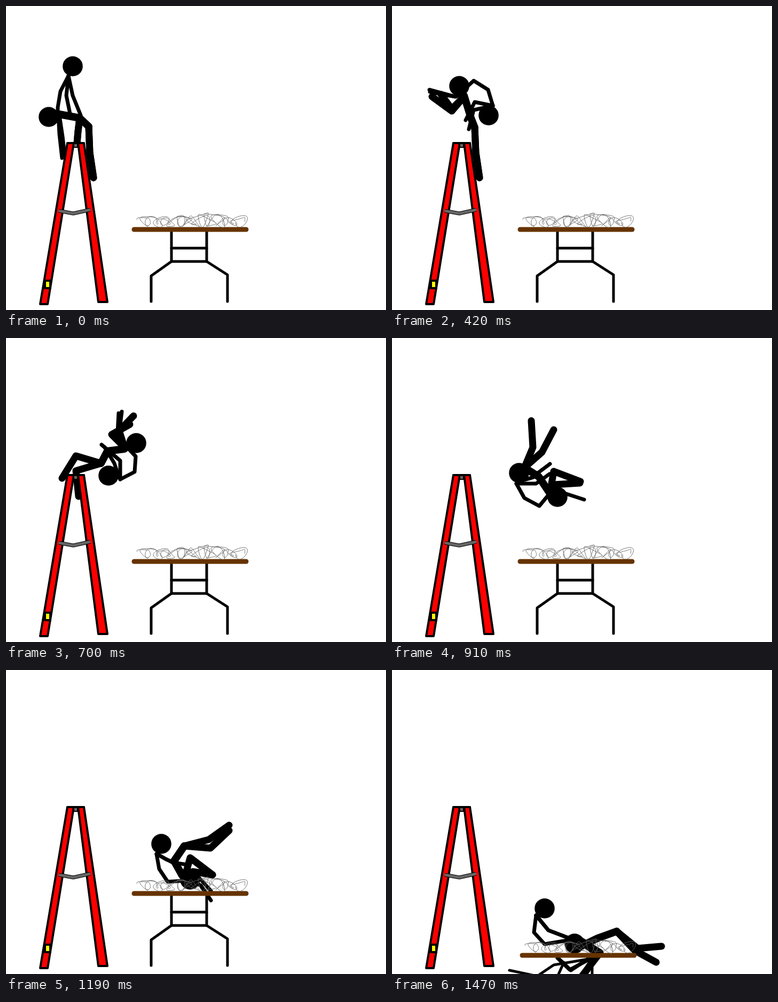
Write an HTML page with a canvas that moves like this. It is 712 by 570 pixels and loops after 1.96 s.

```html
<!DOCTYPE html>
<html lang="en">
<head>
<meta charset="utf-8">
<title>Ladder fall</title>
<style>
html, body { margin: 0; width: 100%; height: 100%; overflow: hidden; background: #fff; }
canvas { display: block; }
</style>
</head>
<body>
<canvas id="stage" width="712" height="570"></canvas>
<script>
const ctx = document.getElementById('stage').getContext('2d');
const LOOP = 1960, STEP = 70;
const KEYS = [0, 3, 6, 10, 13, 17, 21];

const points = text => text.split(' ').map(p => p.split(',').map(Number));
const part = (width, ...poses) => ({ width, poses: poses.map(points) });
const mix = (a, b, k) => a + (b - a) * k;
const mixPoint = (p, q, k) => [mix(p[0], q[0], k), mix(p[1], q[1], k)];

// hip, waist, neck, head
const torso = part(14,
  '155,226 138,210 100,203 80,208',
  '155,228 138,213 102,188 84,188',
  '155,228 148,210 135,168 126,150',
  '178,235 190,212 222,208 244,197',
  '248,243 275,260 295,290 310,298',
  '334,330 315,358 330,385 345,393',
  '421,490 385,503 350,520 342,513');

const legs = [
  part(13,
    '155,226 157,275 164,322', '155,228 157,275 164,322', '155,228 157,275 164,322',
    '178,235 131,221 105,263', '248,243 264,205 261,155',
    '334,330 380,318 418,291', '421,490 460,522 505,518'),
  part(13,
    '155,226 157,275 164,322', '155,228 157,275 164,322', '155,228 157,275 164,322',
    '178,235 131,249 136,297', '248,243 281,214 303,172',
    '334,330 383,334 418,301', '421,490 455,526 495,548')
];

// limbs carried along by the neck of the torso
const carried = [
  part(13,
    '138,210 135,235 133,257', '138,213 125,234 112,254', '135,170 112,197 75,170',
    '222,205 212,174 239,146', '296,290 303,250 353,269',
    '335,388 345,352 387,384', '350,505 390,530 355,575'),
  part(13,
    '138,210 135,235 133,257', '138,213 125,234 112,254', '135,170 112,193 92,166',
    '222,205 198,181 232,162', '296,288 303,275 352,272',
    '335,388 350,378 387,384', '350,505 385,532 360,570'),
  part(7,
    '98,203 100,240 105,285', '102,190 96,215 58,248', '135,165 118,170 70,157',
    '222,200 209,178 211,141', '300,285 320,290 360,303',
    '335,390 365,404 384,432', '365,545 333,562 310,540'),
  part(7,
    '100,205 106,245 110,280', '104,192 102,217 76,257', '120,170 100,167 71,161',
    '222,200 212,178 217,138', '295,288 272,254 296,236',
    '335,390 362,390 384,414', '370,540 335,563 312,541')
];

const rider = part(0, '125,113', '181,148', '181,205', '192,258', '238,253', '291,326', '286,447');
const riderArms = [
  part(7,
    '117,131 102,160 97,190 97,200', '163,149 130,151 105,170 102,190',
    '189,187 180,157 153,140 140,152', '214,265 241,251 243,222 230,208',
    '233,273 248,300 276,315 295,292', '282,345 287,373 303,397 335,395',
    '270,460 266,492 286,514 340,505'),
  part(7,
    '117,131 113,168 120,202', '163,149 134,173 141,210', '189,187 155,180 138,214',
    '214,265 214,230 179,200', '233,273 270,273 295,255',
    '282,345 312,361 340,365', '270,460 293,488 335,504'),
  part(7,
    '117,131 125,168 140,205', '163,149 134,173 141,210', '189,187 153,195 144,231',
    '212,262 203,235 185,205', '240,268 262,262 275,258',
    '283,345 300,355 317,362', '270,460 293,488 335,504')
];

// each pair: standing, broken
const tableLegs = [
  part(5, '310,424 310,479 272,506 272,554', '362,543 303,553 272,574 220,563'),
  part(5, '376,424 376,479 415,504 415,554', '375,540 375,595 415,620 415,670'),
  part(5, '310,454 376,454', '322,548 310,575'),
  part(5, '310,479 376,479', '303,600 370,600')
];

// Limbs swing by angle; large swings favour the clockwise way.
function swing(a, b, k) {
  const out = [mixPoint(a[0], b[0], k)];
  for (let i = 1; i < a.length; i++) {
    const ax = a[i][0] - a[i - 1][0], ay = a[i][1] - a[i - 1][1];
    const bx = b[i][0] - b[i - 1][0], by = b[i][1] - b[i - 1][1];
    const from = Math.atan2(ay, ax);
    let turn = Math.atan2(by, bx) - from;
    while (turn > Math.PI + 1) turn -= 2 * Math.PI;
    while (turn <= 1 - Math.PI) turn += 2 * Math.PI;
    const length = mix(Math.hypot(ax, ay), Math.hypot(bx, by), k);
    const angle = from + turn * k, last = out[i - 1];
    out.push([last[0] + length * Math.cos(angle), last[1] + length * Math.sin(angle)]);
  }
  return out;
}

function line(pts, width, color = '#000', cap = 'round') {
  ctx.beginPath();
  pts.forEach(p => ctx.lineTo(p[0], p[1]));
  ctx.lineWidth = width;
  ctx.strokeStyle = color;
  ctx.lineCap = cap;
  ctx.lineJoin = 'round';
  ctx.stroke();
}

function shape(text, fill, width) {
  ctx.beginPath();
  points(text).forEach(p => ctx.lineTo(p[0], p[1]));
  ctx.closePath();
  ctx.fillStyle = fill;
  ctx.fill();
  ctx.lineWidth = width;
  ctx.strokeStyle = '#000';
  ctx.lineJoin = 'round';
  ctx.stroke();
}

function head([x, y]) {
  ctx.beginPath();
  ctx.arc(x, y, 18.8, 0, 2 * Math.PI);
  ctx.fillStyle = '#000';
  ctx.fill();
}

function figures(i, k) {
  const pose = p => swing(p.poses[i], p.poses[i + 1], k);
  const body = pose(torso);
  const straight = mixPoint(torso.poses[i][2], torso.poses[i + 1][2], k);
  const dx = body[2][0] - straight[0], dy = body[2][1] - straight[1];
  line(body.slice(0, 3), torso.width);
  legs.forEach(p => line(pose(p), p.width));
  carried.forEach(p => line(pose(p).map(([x, y]) => [x + dx, y + dy]), p.width));
  riderArms.forEach(p => line(pose(p), p.width));
  head(body[3]);
  head(pose(rider)[0]);
}

function ladder() {
  shape('115,257 127,257 78,559 64,559', '#f00', 4);
  shape('135,257 146,257 190,555 173,555', '#f00', 4);
  line([[115, 257], [146, 257]], 4);
  shape('127,258 134,258 134,265 127,265', '#666', 2);
  const brace = [[99, 384], [126, 389], [158, 382]];
  line(brace, 7, '#000', 'butt');
  line(brace, 5, '#666', 'butt');
  shape('73,515 83,515 83,529 73,529', '#ff0', 4);
}

function wireLoop(turns, phase, size) {
  const pts = [];
  for (let n = 0; n <= 420; n++) {
    const u = n / 420, a = 2 * Math.PI * turns * u + phase;
    const bump = 4 * Math.exp(-(((u - 0.62) / 0.16) ** 2));
    const r = size + bump + 2.5 * Math.sin(a * 0.37 + phase);
    pts.push([
      256 + 187 * u + r * Math.cos(a) + 3 * Math.sin(a * 1.7),
      404 - bump / 2 + r * 0.9 * Math.sin(a + Math.sin(a * 0.6))
    ]);
  }
  return pts;
}
const wires = [wireLoop(13, 2.6, 10), wireLoop(8, 0.7, 8)];

function table(k) {
  tableLegs.forEach(p => line(swing(p.poses[0], p.poses[1], k), p.width));
  ctx.save();
  ctx.translate(4 * k, 116 * k);
  line([[240, 419], [450, 419]], 9, '#663300');
  wires.forEach(w => line(w, 0.9, '#666'));
  ctx.restore();
}

function draw(time) {
  const step = Math.min(21, Math.floor((time % LOOP) / STEP));
  let i = 0;
  while (i < KEYS.length - 2 && step >= KEYS[i + 1]) i++;
  ctx.fillStyle = '#fff';
  ctx.fillRect(0, 0, 712, 570);
  figures(i, (step - KEYS[i]) / (KEYS[i + 1] - KEYS[i]));
  ladder();
  table(Math.max(0, (step - 17) / 4));
}

const start = performance.now();
function tick() {
  draw(performance.now() - start);
  requestAnimationFrame(tick);
}
tick();
</script>
</body>
</html>
```
